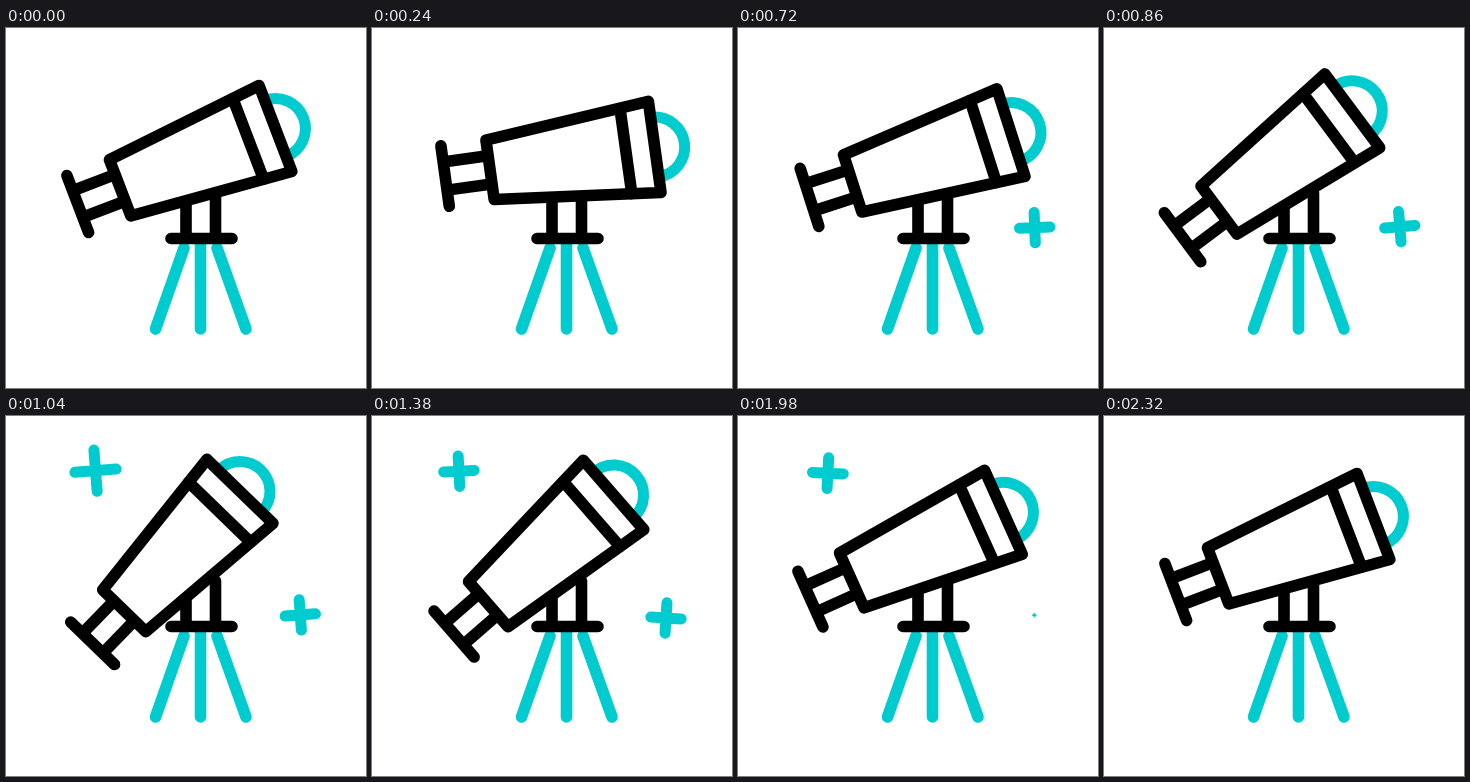
An HTML page that plays this animation: 360x360 px, repeating every 2.4 s.

```html
<!DOCTYPE html>
<html lang="en">
<head>
<meta charset="utf-8">
<title>Telescope</title>
<style>
html, body { margin: 0; width: 100%; height: 100%; overflow: hidden; background: #fff; }
svg { display: block; width: 100vw; height: 100vh; }
path { fill: none; stroke: #000; stroke-width: 11.6; stroke-linecap: round; stroke-linejoin: round; }
.accent { stroke: #00cccf; }
.ring { stroke-width: 11; }
.body { fill: #fff; }
</style>
</head>
<body>
<svg viewBox="0 0 360 360">
  <path class="accent" d="M178 220L149.500 301M194.500 214V301M211 220L240 301"/>
  <path d="M180 165V210M209.500 165V210M165 210.500H226"/>
  <g id="scope">
    <path class="accent ring" d="M93.600 -30A30 30 0 0 0 93.600 30" transform="scale(-1 1) translate(-187.200 -36.500)"/>
    <path class="body" d="M-72.600 -66.500L93.600 -82.500V9.500L-72.600 -6.500Z"/>
    <path d="M64.500 -79.500V6.500M-118 -67V-6M-118 -50.700H-73M-118 -22.300H-73"/>
  </g>
  <path id="right" class="accent"/>
  <path id="left" class="accent"/>
</svg>
<script>
const LOOP = 2400, ARM = 15.2, POP = 180, PERIOD = 1200;
const SWING = 25, DOWN = 470, UP = 1015, REST = 2280;
const byId = id => document.getElementById(id);
const scope = byId('scope');
const ring = scope.querySelector('.ring');
ring.setAttribute('d', 'M0 -30A30 30 0 0 1 0 30');
ring.setAttribute('transform', 'translate(93.6 -36.5)');

const stars = [
  { el: byId('right'), x: 295.2, y: 200.6, sway: 5, low: 930, enter: 360, leave: 2010 },
  { el: byId('left'), x: 88.4, y: 56.2, sway: 6, low: 1180, enter: 880, leave: 2320 }
];

// Sine ease from a to b, p clamped to 0..1
function mix(a, b, p) {
  p = Math.min(1, Math.max(0, p));
  return a + (b - a) * (1 - Math.cos(Math.PI * p)) / 2;
}

function tilt(t) {
  if (t < DOWN) return mix(0, SWING, t / DOWN);
  if (t < UP) return mix(SWING, -SWING, (t - DOWN) / (UP - DOWN));
  return mix(-SWING, 0, (t - UP) / (REST - UP));
}

// Grow past full size, then settle at 1
const pop = d => d < POP ? mix(0, 1.4, d / POP) : mix(1.4, 1, d / POP - 1);

function drawStar(s, t) {
  const size = pop(t - s.enter) * pop(s.leave - t), arm = ARM * size;
  const a = 2 * Math.PI * (t - s.low) / PERIOD;
  const x = s.x - 1.7 * Math.sin(a), y = s.y - 2 * Math.cos(a);
  s.el.style.display = size > 0.01 ? '' : 'none';
  s.el.style.strokeWidth = 11 * Math.min(1, size * 2);
  s.el.setAttribute('d', `M${-arm} 0H${arm}M0 ${-arm}V${arm}`);
  s.el.setAttribute('transform', `translate(${x} ${y}) rotate(${-s.sway * Math.cos(a)})`);
}

function render(t) {
  scope.setAttribute('transform', `translate(195 168) rotate(${tilt(t) - 20.9})`);
  stars.forEach(s => drawStar(s, t));
}

const start = performance.now();
function tick(now) {
  render(Math.max(0, now - start) % LOOP);
  requestAnimationFrame(tick);
}
render(0);
requestAnimationFrame(tick);
</script>
</body>
</html>
```
